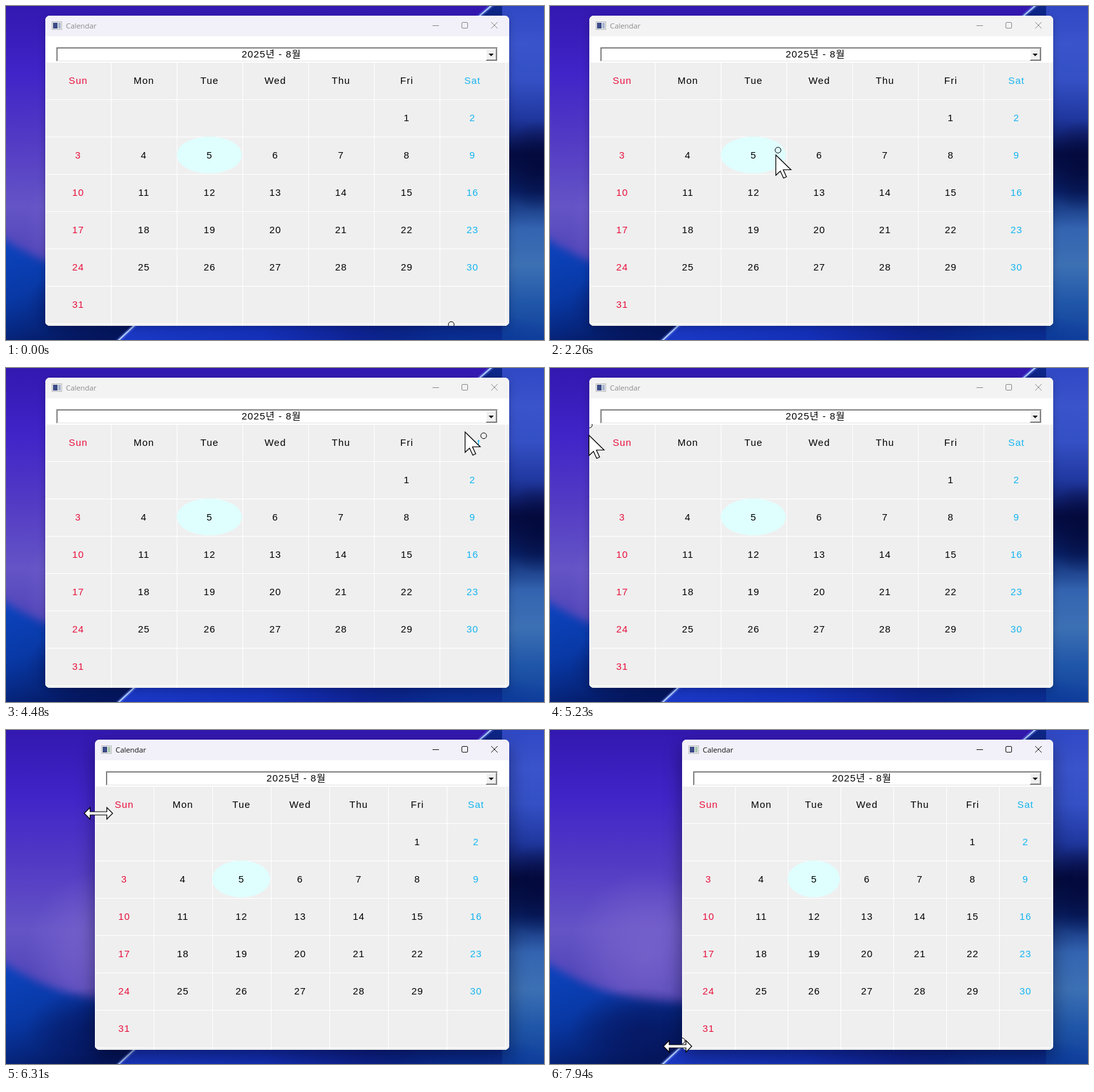
An HTML page with a canvas for the animation above (8000 ms loop, 835 by 519 pixels).

```html
<!DOCTYPE html>
<html lang="ko">
<head>
<meta charset="utf-8">
<title>Calendar</title>
<style>
html, body { margin: 0; width: 100%; height: 100%; overflow: hidden; background: #1a1470; }
canvas { display: block; }
</style>
</head>
<body>
<canvas id="stage" width="835" height="519"></canvas>
<script>
const W = 835, H = 519, LOOP = 8000;
const RIGHT = 781, TOP = 15, BOTTOM = 497, GRID_TOP = 87, ROW = 58;
const RED = '#e8103c', BLUE = '#14b4f0';
const DAYS = ['Sun', 'Mon', 'Tue', 'Wed', 'Thu', 'Fri', 'Sat'];
const ctx = document.getElementById('stage').getContext('2d');

// Pointer moves: start, end, evenly timed points; each begins where the last ended
const START = [691, 525];
const MOVES = [
  [70, 690, [706, 330], [700, 180]],
  [960, 1720, [500, 150], [290, 226], [560, 150], [718, 118]],
  [2060, 2530, [361, 211], [350, 231], [339, 243], [337, 244]],
  [3060, 3340, [339, 136]],
  [3670, 4280, [361, 136], [470, 120], [610, 102], [720, 100], [754, 108]],
  [4480, 5230, [670, 90], [480, 68], [270, 62], [110, 64], [62, 60], [60, 104]],
  [5300, 5570, [57, 129], [52, 129]],
  [5970, 6590, [80, 129], [112, 129], [143.5, 129], [175, 129], [192, 129]],
  [6790, 6850, [196.5, 129]],
  [7050, 7730, [195, 320], [208, 497], [199, 490]],
  [7870, 7940, [198, 491]]
];

function along(points, p) {
  const s = Math.max(0, Math.min(1, p)) * (points.length - 1);
  const i = Math.min(points.length - 2, Math.floor(s));
  return points[i].map((v, k) => v + (points[i + 1][k] - v) * (s - i));
}

// Pointer position and the slightly late position of the ring that follows it
function pose(t) {
  let at = START, late = START, from = START;
  for (const [start, end, ...rest] of MOVES) {
    if (t < start) break;
    const points = [from, ...rest];
    const n = Math.round((end - start) / 69) + 1;
    const step = Math.min(n, Math.round((t - start) / (end - start) * (n - 1)) + 1);
    at = along(points, step / n);
    late = t > end + 60 ? at : along(points, (step - 0.7) / n);
    from = rest.at(-1);
  }
  return { at, late };
}

// The left border follows the pointer while it is dragged
function leftEdge(t, x) {
  if (t < 5970) return 61;
  if (t < 6790) return Math.max(61, Math.floor(x - 5.5));
  return t < 6850 ? 196 : 205;
}

function rect(c, x, y, w, h, color) {
  c.fillStyle = color;
  c.fillRect(x, y, w, h);
}

function path(c, points) {
  c.beginPath();
  points.forEach(p => c.lineTo(...p));
  c.closePath();
}

function makeWallpaper() {
  const canvas = document.createElement('canvas');
  canvas.width = W;
  canvas.height = H;
  const c = canvas.getContext('2d');
  // Evenly spaced colour stops
  const fade = (x0, y0, x1, y1, colors) => {
    const g = c.createLinearGradient(x0, y0, x1, y1);
    const list = colors.split(' ');
    list.forEach((color, i) => g.addColorStop(i / (list.length - 1), color));
    return g;
  };
  const blob = (x, y, rx, ry, color) => {
    c.save();
    c.translate(x, y);
    c.scale(rx, ry);
    const g = c.createRadialGradient(0, 0, 0, 0, 0, 1);
    g.addColorStop(0, color + 'b0');
    g.addColorStop(0.5, color + '70');
    g.addColorStop(1, color + '00');
    rect(c, -1, -1, 2, 2, g);
    c.restore();
  };
  rect(c, 0, 0, W, H, fade(0, 0, 0, H, '#3318b0 #4124c8 #533ac4 #6454c6 #4a40b4 #1428a0'));
  blob(150, 350, 120, 130, '#8068ce');

  // blue fold at the lower left
  c.save();
  c.filter = 'blur(7px)';
  c.beginPath();
  c.moveTo(-30, 345);
  c.bezierCurveTo(30, 385, 90, 425, 230, 425);
  c.lineTo(230, 560);
  c.lineTo(-30, 560);
  c.fillStyle = fade(0, 360, 60, 540, '#0c44c0 #0838a4 #04165c');
  c.fill();
  c.restore();
  blob(140, 465, 110, 65, '#06145c');

  // field on the far side of the bright edge
  path(c, [[174, H], [755, -4], [W, -4], [W, H]]);
  c.fillStyle = fade(180, 0, W, 0, '#1a38c4 #1430b8 #0c1c80 #0e2c8c');
  c.fill();
  rect(c, 770, 0, 65, H, fade(0, 0, 0, H,
    '#3048c4 #3a54cc #3450c4 #2038a0 #050e46 #0a246c #3464b0 #3c70b4 #2056a8 #10409c'));
  blob(825, 250, 60, 70, '#020634');
  blob(700, 515, 160, 40, '#083296');

  for (const [width, color] of [[7, '#6e78f04c'], [3, '#82aafacc'], [1.2, '#c0dcff']]) {
    c.strokeStyle = color;
    c.lineWidth = width;
    c.beginPath();
    c.moveTo(173, 521);
    c.quadraticCurveTo(440, 270, 755, -2);
    c.stroke();
  }
  return canvas;
}
const wallpaper = makeWallpaper();

function label(text, x, y, color) {
  ctx.fillStyle = color;
  ctx.fillText(text, x, y);
}

function drawTitleBar(left, active, tinted) {
  rect(ctx, left, TOP, RIGHT - left, 32, tinted ? '#f2f0f8' : '#f3f3f3');
  const x = left + 10;
  rect(ctx, x, 24, 16, 13, '#b8b8bc');
  rect(ctx, x + 1, 25, 14, 11, '#f4f4f4');
  rect(ctx, x + 2, 26, 7, 9, '#3c4c88');
  rect(ctx, x + 10, 26, 4, 9, active ? '#a8c8b0' : '#a8b4cc');
  ctx.font = '11.3px "Open Sans", "Noto Sans", sans-serif';
  ctx.letterSpacing = '0px';
  ctx.textAlign = 'left';
  label('Calendar', left + 32, 35, active ? '#111' : '#8c8c8c');
  ctx.strokeStyle = active ? '#1a1a1a' : '#8c8c8c';
  ctx.lineWidth = 1;
  ctx.beginPath();
  ctx.moveTo(662, 30.5);
  ctx.lineTo(672, 30.5);
  ctx.roundRect(707.5, 25.5, 9, 9, 1.5);
  ctx.moveTo(753, 25);
  ctx.lineTo(763, 35);
  ctx.moveTo(763, 25);
  ctx.lineTo(753, 35);
  ctx.stroke();
}

function drawCombo(left) {
  const x = left + 17, w = 763 - x;
  rect(ctx, x, 64, w, 22, '#a0a0a0');
  rect(ctx, x + 1, 65, w - 1, 21, '#e3e3e3');
  rect(ctx, x + 1, 65, w - 2, 20, '#696969');
  rect(ctx, x + 2, 66, w - 3, 19, '#fff');
  rect(ctx, 745, 66, 17, 19, '#696969');
  rect(ctx, 745, 66, 16, 18, '#fff');
  rect(ctx, 746, 67, 15, 17, '#a0a0a0');
  rect(ctx, 746, 67, 14, 16, '#f0f0f0');
  path(ctx, [[749, 74], [757, 74], [753, 78]]);
  ctx.fillStyle = '#000';
  ctx.fill();
  ctx.font = '15px "Liberation Sans", "Noto Sans CJK KR", "Noto Sans CJK", sans-serif';
  ctx.letterSpacing = '1px';
  ctx.textAlign = 'center';
  label('2025년 - 8월', (x + 746) / 2, 80, '#000');
}

function drawGrid(left) {
  const w = Math.floor((RIGHT - left) / 7);
  rect(ctx, left, GRID_TOP, RIGHT - left, BOTTOM - GRID_TOP, '#efefef');
  for (let k = 0; k < 8; k++) {
    rect(ctx, left + k * w, GRID_TOP, 1, BOTTOM - GRID_TOP, '#fff');
    rect(ctx, left, GRID_TOP + k * ROW, RIGHT - left, 1, '#fff');
  }
  ctx.fillStyle = '#dfffff';
  ctx.beginPath();
  ctx.ellipse(left + 2.5 * w - 0.5, 231.5, w / 2 - 0.5, 28.5, 0, 0, 7);
  ctx.fill();
  for (let i = 0; i < 49; i++) {
    const col = i % 7, row = Math.floor(i / 7), day = i - 11;
    const text = row ? (day > 0 && day < 32 ? day : '') : DAYS[col];
    const color = col === 0 ? RED : col === 6 ? BLUE : '#000';
    label(text, left + (col + 0.5) * w, GRID_TOP + row * ROW + 34, color);
  }
}

function drawRing(x, y, left) {
  ctx.save();
  ctx.beginPath();
  ctx.rect(left, GRID_TOP, RIGHT - left, BOTTOM - GRID_TOP);
  ctx.clip();
  ctx.beginPath();
  ctx.arc(Math.max(left, x), Math.min(495, y), 4.5, 0, 7);
  ctx.strokeStyle = '#000';
  ctx.lineWidth = 1;
  ctx.stroke();
  ctx.restore();
}

const ARROW = [[0.5, 0.5], [0.5, 32], [7.5, 25.5], [12.5, 36.5], [17, 34.5], [12, 23.5], [24, 23.5]];
const HALF = [[-22, 0], [-13, -9], [-13, -2.5]];
const flip = (points, sx, sy) => points.map(([x, y]) => [x * sx, y * sy]);
const RESIZE = [...HALF, ...flip(HALF, -1, 1).reverse(),
  ...flip(HALF, -1, -1).slice(1), ...flip(HALF, 1, -1).slice(1).reverse()];

function drawPointer(x, y, shape) {
  ctx.save();
  ctx.translate(x, y);
  path(ctx, shape);
  ctx.fillStyle = '#fff';
  ctx.fill();
  ctx.strokeStyle = '#000';
  ctx.lineWidth = 1.2;
  ctx.stroke();
  ctx.restore();
}

function draw(t) {
  const { at: [x, y], late } = pose(t);
  const left = leftEdge(t, x), active = t >= 5970;
  ctx.drawImage(wallpaper, 0, 0);
  ctx.save();
  ctx.beginPath();
  ctx.roundRect(left, TOP, RIGHT - left, BOTTOM - TOP, 7);
  ctx.shadowColor = `rgba(0,0,20,${active ? 0.45 : 0.25})`;
  ctx.shadowBlur = active ? 28 : 12;
  ctx.shadowOffsetY = active ? 10 : 3;
  ctx.fillStyle = '#fff';
  ctx.fill();
  ctx.shadowColor = 'transparent';
  ctx.clip();
  drawTitleBar(left, active, active || t < 70);
  drawCombo(left);
  drawGrid(left);
  ctx.restore();
  if (t < 5300) drawRing(...late, left);
  else if (t >= 7600) drawRing(205, 483, left);
  if (t < 5370) drawPointer(x, y, ARROW);
  else drawPointer(x, y + 0.5, RESIZE);
}

function frame() {
  draw(performance.now() % LOOP);
  requestAnimationFrame(frame);
}
frame();
</script>
</body>
</html>
```
